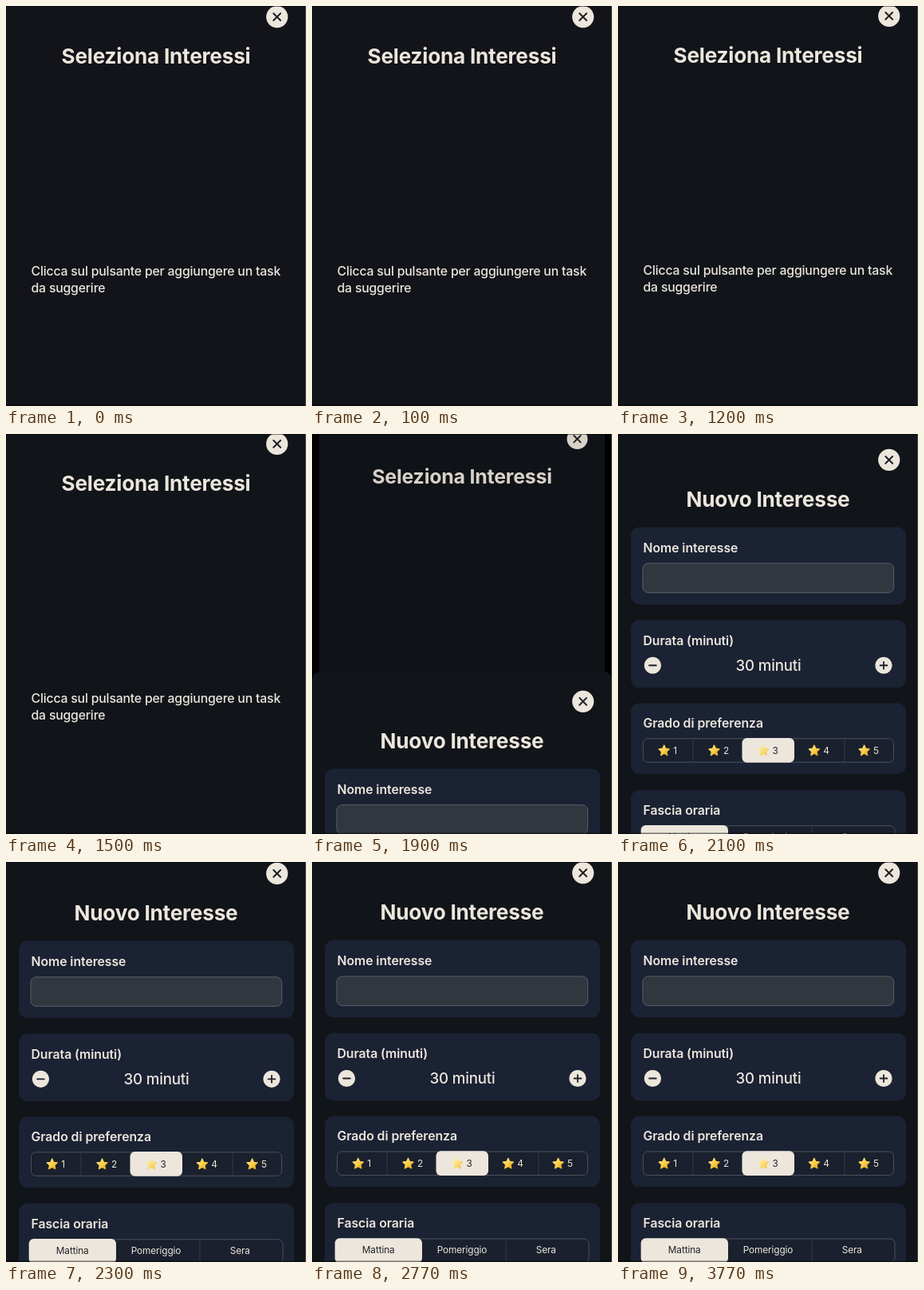
These frames come from a looping animation (376 by 500 pixels, 3.87 s). An HTML page:

```html
<!DOCTYPE html>
<html lang="it">
<head>
<meta charset="utf-8">
<title>Nuovo Interesse</title>
<style>
  html, body { margin: 0; width: 100%; height: 100%; overflow: hidden; background: #000; }
  svg { display: block; width: 100%; height: 100%; font-family: Inter, Roboto, sans-serif; fill: #ece6dc; }
  .title { font-size: 26.2px; font-weight: 700; letter-spacing: -.24px; text-anchor: middle; }
  .body { font-size: 15.8px; font-weight: 450; letter-spacing: -.19px; }
  .label { font-size: 15.8px; font-weight: 600; letter-spacing: -.06px; }
  .value { font-size: 18.7px; font-weight: 450; letter-spacing: -.2px; text-anchor: middle; }
  .seg { font-size: 11.8px; letter-spacing: -.1px; }
  .mid { text-anchor: middle; }
  .dark { fill: #22242a; }
  .card { fill: #1b2233; }
  .frame { fill: #1a202d; stroke: #4b515d; }
  .rule { stroke: #343a48; }
  .glyph { fill: none; stroke: #1d2026; stroke-linecap: round; }
</style>
</head>
<body>
<svg viewBox="0 0 376 500" xmlns="http://www.w3.org/2000/svg">
  <defs>
    <linearGradient id="gold" x1="0" y1="0" x2="1" y2="1">
      <stop offset="0" stop-color="#ffe88b"/>
      <stop offset=".55" stop-color="#fbcd45"/>
      <stop offset="1" stop-color="#d99a20"/>
    </linearGradient>
    <linearGradient id="pale" x1="0" y1="0" x2="1" y2="1">
      <stop offset="0" stop-color="#fff3bd"/>
      <stop offset=".55" stop-color="#fbdc74"/>
      <stop offset="1" stop-color="#edbd4c"/>
    </linearGradient>
    <g id="close">
      <circle cx="339.7" cy="13.6" r="13.6"/>
      <path class="glyph" stroke-width="2" d="M335.3 9.2l8.8 8.8m0-8.8l-8.8 8.8"/>
    </g>
  </defs>
  <rect width="376" height="500" fill="#000"/>
  <g id="back">
    <rect id="backFill" y="-18" width="376" height="800" rx="10"/>
    <text class="title" x="188" y="72">Seleziona Interessi</text>
    <use href="#close"/>
    <text class="body" x="31.5" y="337">Clicca sul pulsante per aggiungere un task</text>
    <text class="body" x="31.5" y="358.3">da suggerire</text>
  </g>
  <rect id="dim" width="376" height="500" fill="#000"/>
  <g id="sheet">
    <rect y="-23.5" width="376" height="800" rx="10" fill="#11151a"/>
    <use href="#close"/>
    <text class="title" x="188" y="72.2">Nuovo Interesse</text>
    <g id="form"></g>
  </g>
  <g fill="#000">
    <rect width="376" height="1" opacity=".5"/>
    <rect y="498.5" width="376" height="1.5" opacity=".5"/>
    <rect x="375" width="1" height="500" fill="#4a4b4d"/>
  </g>
</svg>
<script>
const LOOP = 3870, STEP = 100;
const OPEN = 1780, OMEGA = 18, TRAVEL = 880;
const $ = id => document.getElementById(id);

const box = (cls, x, y, w, h, r) =>
  `<rect class="${cls}" x="${x}" y="${y}" width="${w}" height="${h}" rx="${r}"/>`;
const text = (cls, x, y, s) => `<text class="${cls}" x="${x}" y="${y}">${s}</text>`;
const rule = (x, y, h) => `<path class="rule" d="M${x} ${y}v${h}"/>`;

function star(x, y, fill) {
  const points = Array.from({ length: 10 }, (_, i) => {
    const a = (i / 5 - .5) * Math.PI, r = i % 2 ? 3.4 : 7;
    return `${(x + r * Math.cos(a)).toFixed(2)},${(y + r * Math.sin(a)).toFixed(2)}`;
  });
  return `<polygon points="${points.join(' ')}" fill="url(#${fill})"
    stroke="url(#${fill})" stroke-width="1.2" stroke-linejoin="round"/>`;
}

function roundButton(x, y, plus) {
  return `<circle cx="${x}" cy="${y}" r="10.6"/>
    <path class="glyph" stroke-width="1.8" d="M${x - 4.4} ${y}h8.8${plus ? `M${x} ${y - 4.4}v8.8` : ''}"/>`;
}

function ratings() {
  let out = box('frame', 31.5, 362, 314, 29.5, 6) + rule(94, 363, 28) + rule(284, 363, 28)
    + box('', 155.5, 361.3, 65.5, 30.7, 6);
  for (let i = 0; i < 5; i++) {
    const x = 57.8 + 62.7 * i - (i === 2 ? 1 : 0), on = i === 2;
    out += star(x, 377.2, on ? 'pale' : 'gold')
      + text(on ? 'seg dark' : 'seg', x + 11.4, 381, i + 1);
  }
  return out;
}

$('form').innerHTML =
  box('card', 16, 97.7, 345, 96.5, 11)
  + box('card', 16, 213.8, 345, 84.5, 11)
  + box('card', 16, 317.8, 345, 88.5, 11)
  + box('card', 16, 426.2, 345, 95, 11)
  + text('label', 31.5, 129.1, 'Nome interesse')
  + '<rect x="31" y="143" width="314.7" height="36.6" rx="7" fill="#31363f" stroke="#5a5f68"/>'
  + text('label', 31.5, 244.8, 'Durata (minuti)')
  + roundButton(43.5, 270.5, false)
  + text('value', 188.5, 277.2, '30 minuti')
  + roundButton(333, 270.5, true)
  + text('label', 31.5, 348.1, 'Grado di preferenza')
  + ratings()
  + text('label', 31.5, 457.1, 'Fascia oraria')
  + box('frame', 29.5, 471, 317.5, 29.5, 6) + rule(243, 472, 28)
  + box('', 28.7, 470.2, 109.3, 31, 6)
  + text('seg mid dark', 83.2, 489.2, 'Mattina')
  + text('seg mid', 188, 489.2, 'Pomeriggio')
  + text('seg mid', 293.3, 489.2, 'Sera');

// Critically damped spring: 1 at the start, falling to 0.
function spring(ms) {
  const x = OMEGA * Math.max(0, ms) / 1000;
  return (1 + x) * Math.exp(-x);
}

function draw(ms) {
  const t = Math.floor((ms % LOOP) / STEP) * STEP;
  const left = spring(t - OPEN), p = 1 - left;
  const lift = t < 1200 ? 0 : -1.2;
  const scale = 1 - .075 * p;
  $('back').setAttribute('transform',
    `translate(${188 * (1 - scale)} ${lift - 8.8 * p}) scale(${scale})`);
  $('backFill').setAttribute('fill', t < 1200 ? '#13141a' : '#11151a');
  $('dim').setAttribute('opacity', .14 * p);
  $('sheet').setAttribute('transform', `translate(0 ${TRAVEL * left})`);
}

const start = performance.now();
function tick() {
  draw(performance.now() - start);
  requestAnimationFrame(tick);
}
tick();
</script>
</body>
</html>
```
